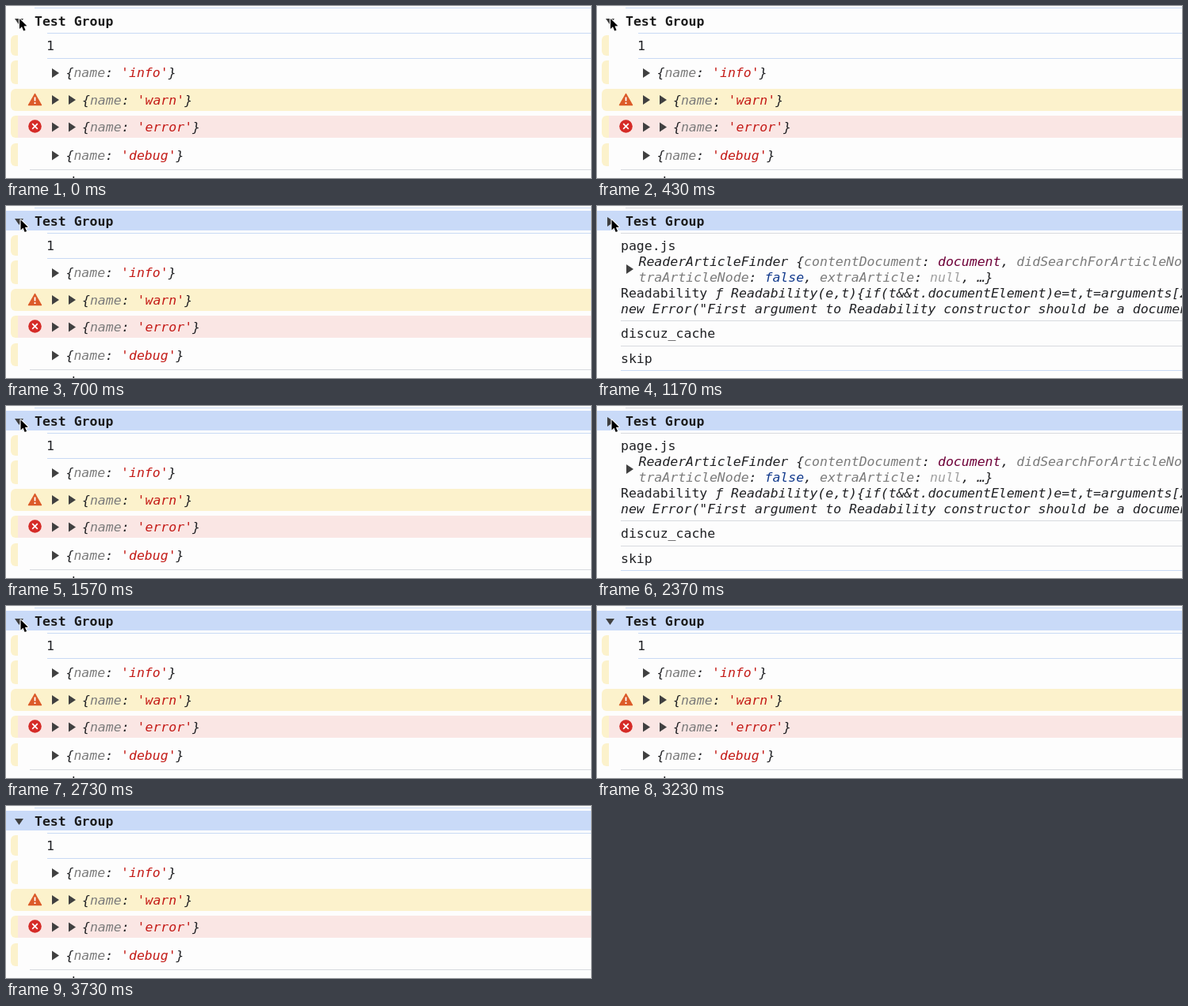
Recreate the animation shown at these times as an HTML page with a canvas. Size 738x218 px, loop 3.76 s.

```html
<!DOCTYPE html>
<html lang="en">
<head>
<meta charset="utf-8">
<title>Console group</title>
<style>
html, body { margin: 0; width: 100%; height: 100%; overflow: hidden; background: #fdfdfd; }
canvas { display: block; }
</style>
</head>
<body>
<canvas id="stage" width="738" height="218"></canvas>
<script>
const ctx = document.getElementById('stage').getContext('2d');
const WIDTH = 738, HEIGHT = 218, LOOP = 3760;
const INK = '#202124', GREY = '#7b7b7b', RED = '#c41a16', ARROW = '#404040';
const BLUE_LINE = '#c9daf4', GREY_LINE = '#d8dadf', YELLOW = '#fcf2cc';

const HOVER_AT = 600, CURSOR_LEAVES = 2950, CURSOR_GONE = 3010;
const TOGGLES = [900, 1370, 1880, 2520];

function rect(x, y, w, h, color) {
  ctx.fillStyle = color;
  ctx.fillRect(x, y, w, h);
}

function rule(x, y, color) {
  rect(x, y, WIDTH - x, 1, color);
}

function polygon(points, color) {
  ctx.beginPath();
  points.forEach(([x, y]) => ctx.lineTo(x, y));
  ctx.closePath();
  ctx.fillStyle = color;
  ctx.fill();
}

function text(x, y, runs, style = '') {
  ctx.font = `${style} 16.5px "DejaVu Sans Mono", monospace`;
  for (const [words, color] of runs) {
    ctx.fillStyle = color;
    ctx.fillText(words, x, y);
    x += ctx.measureText(words).width;
  }
}

function arrowRight(x, y) {
  polygon([[x, y - 6], [x + 9, y], [x, y + 6]], ARROW);
}

function leftRounded(y, h, right) {
  ctx.beginPath();
  ctx.roundRect(6, y, right - 6, h, [6, 0, 0, 6]);
  ctx.fillStyle = YELLOW;
  ctx.fill();
}

function objectRow(x, baseline, value) {
  text(x, baseline, [['{', INK], ['name', GREY], [': ', INK], [`'${value}'`, RED], ['}', INK]], 'italic');
}

function warningIcon() {
  const color = '#dc5b29';
  polygon([[36.5, 111.5], [44.5, 125.5], [28.5, 125.5]], color);
  ctx.strokeStyle = color;
  ctx.lineWidth = 1.5;
  ctx.lineJoin = 'round';
  ctx.stroke();
  rect(35.6, 115.5, 1.8, 5, '#fff');
  rect(35.6, 122, 1.8, 2, '#fff');
}

function errorIcon() {
  ctx.beginPath();
  ctx.arc(36.5, 152.5, 8.3, 0, Math.PI * 2);
  ctx.fillStyle = '#d52b27';
  ctx.fill();
  ctx.beginPath();
  ctx.moveTo(33.2, 149.2); ctx.lineTo(39.8, 155.8);
  ctx.moveTo(39.8, 149.2); ctx.lineTo(33.2, 155.8);
  ctx.strokeStyle = '#fff';
  ctx.lineWidth = 1.7;
  ctx.stroke();
}

function drawHeader(open, highlighted) {
  rule(36, 2, open ? BLUE_LINE : GREY_LINE);
  if (highlighted) rect(0, 6, WIDTH, 25, '#c9daf8');
  if (open) polygon([[11, 16], [22, 16], [16.5, 24]], ARROW);
  else arrowRight(13, 20);
  text(36, 25, [['Test Group', '#1b1b1b']], 'bold');
}

function drawOpenGroup() {
  rule(52, 34, BLUE_LINE);
  rule(52, 66, BLUE_LINE);
  [[37, 26], [69, 30], [139, 28], [174, 29]].forEach(([y, h]) => leftRounded(y, h, 15));
  leftRounded(105, 28, WIDTH);
  rect(15, 139, WIDTH - 15, 28, '#fae6e4');

  text(51, 56, [['1', INK]]);
  objectRow(75.5, 90, 'info');
  objectRow(96, 125, 'warn');
  objectRow(96, 159, 'error');
  objectRow(75.5, 195, 'debug');
  [[58, 85], [58, 119], [79, 119], [58, 153.5], [79, 153.5], [58, 189.5]]
    .forEach(([x, y]) => arrowRight(x, y));
  warningIcon();
  errorIcon();

  rule(30, 207, GREY_LINE);
  rect(84.5, 216, 1.6, 2, INK);
}

function drawClosedGroup() {
  rule(30, 34, GREY_LINE);
  text(30, 56, [['page.js', INK]]);
  arrowRight(37, 80);
  text(52.5, 76, [
    ['ReaderArticleFinder {', INK], ['contentDocument', GREY], [': ', INK],
    ['document', '#6e0038'], [', ', INK], ['didSearchForArticleNode', GREY]
  ], 'italic');
  text(52.5, 96, [
    ['traArticleNode', GREY], [': ', INK], ['false', '#123a8d'], [', ', INK],
    ['extraArticle', GREY], [': ', INK], ['null', '#a0a0a0'], [', …}', INK]
  ], 'italic');
  text(30, 116, [['Readability ', INK]]);
  text(149.2, 116, [['ƒ Readability(e,t){if(t&&t.documentElement)e=t,t=arguments[2]', INK]], 'italic');
  text(30, 136, [['new Error("First argument to Readability constructor should be a document', INK]], 'italic');
  rule(30, 145, GREY_LINE);
  text(30, 167, [['discuz_cache', INK]]);
  rule(30, 177, GREY_LINE);
  text(30, 199, [['skip', INK]]);
  rule(30, 208, BLUE_LINE);
}

function drawCursor(x, y) {
  const shape = [[0, 0], [0, 13], [3, 10.3], [5.2, 15.4], [7.6, 14.4], [5.4, 9.4], [9.4, 9.2]];
  polygon(shape.map(([dx, dy]) => [x + dx, y + dy]), '#000');
  ctx.strokeStyle = '#fff';
  ctx.lineWidth = 2;
  ctx.lineJoin = 'round';
  ctx.stroke();
  ctx.fill();
}

function draw(time) {
  const open = TOGGLES.filter(at => time >= at).length % 2 === 0;
  const hovered = time >= HOVER_AT;
  rect(0, 0, WIDTH, HEIGHT, '#fdfdfd');
  drawHeader(open, hovered);
  if (open) drawOpenGroup();
  else drawClosedGroup();
  if (time < HOVER_AT) drawCursor(17, 16);
  else if (time < CURSOR_LEAVES) drawCursor(18.5, 17.5);
  else if (time < CURSOR_GONE) drawCursor(19, 4);
}

function tick() {
  draw(performance.now() % LOOP);
  requestAnimationFrame(tick);
}
tick();
</script>
</body>
</html>
```
